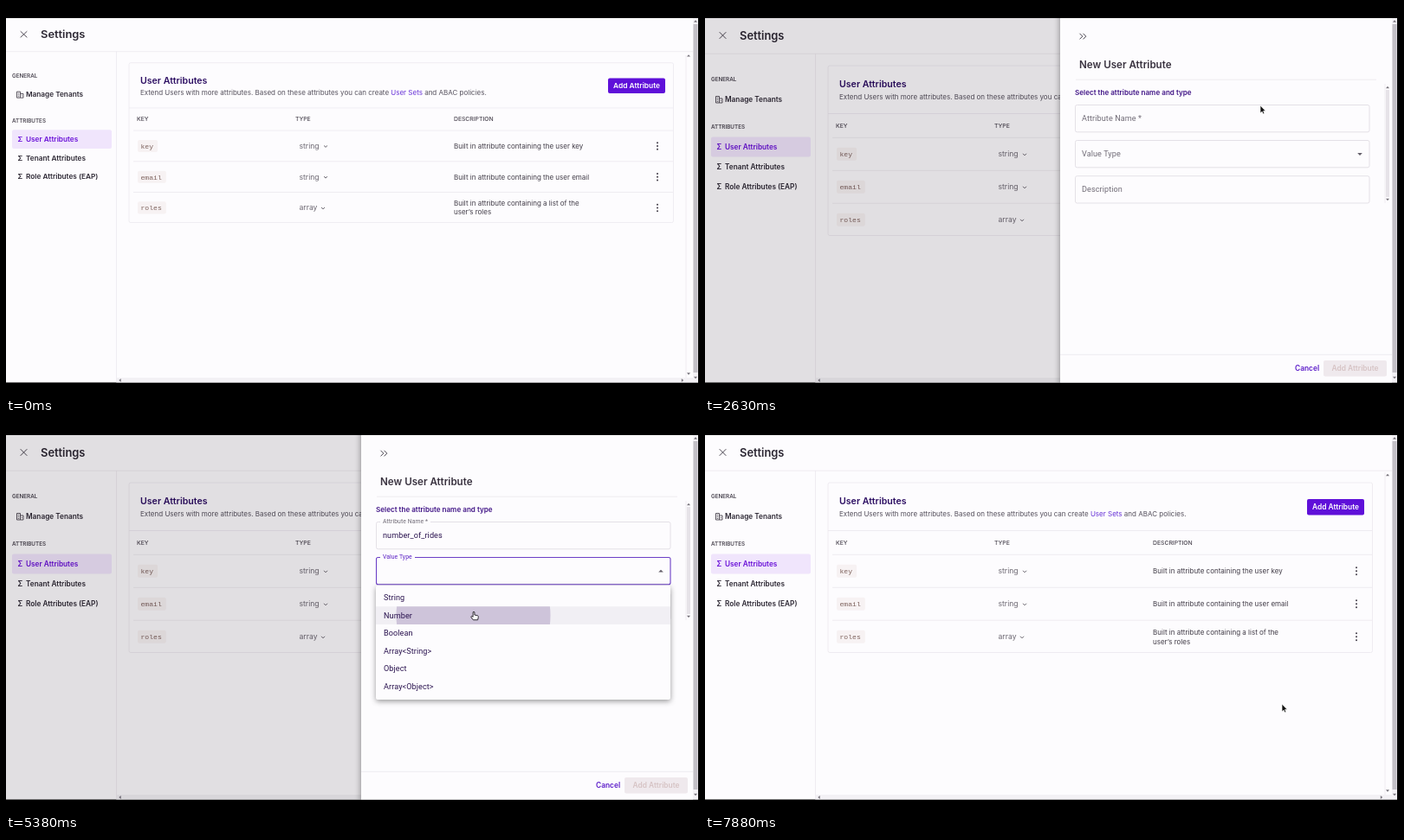
Recreate the animation shown at these times as an HTML page. Size 800 by 450 pixels, loop 8 s.

```html
<!DOCTYPE html>
<html lang="en">
<head>
<meta charset="utf-8">
<title>User attributes</title>
<style>
  html, body { margin: 0; width: 100%; height: 100%; overflow: hidden; background: #000; }
  svg { display: block; width: 800px; height: 450px; }
  text { font: 400 8px Inter, sans-serif; fill: #55505c; dominant-baseline: central; white-space: pre; }
  .nav text { font-size: 8.25px; font-weight: 600; fill: #2c2733; }
  .nav .cap { font-size: 6.3px; fill: #4a4550; }
  .nav .on { fill: #6a11d8; }
  text.page { font-size: 12.9px; font-weight: 600; fill: #2c2733; }
  text.head { font-size: 6.8px; font-weight: 500; fill: #4a4550; }
  text.title { font-size: 10.6px; font-weight: 600; fill: #2d0f63; }
  text.type { font-size: 8.6px; fill: #6b6670; }
  text.desc { fill: #403b46; }
  text.code { font: 8.1px "Liberation Mono", monospace; fill: #7d625d; }
  text.btn { font-size: 8.4px; font-weight: 600; fill: #fff; }
  text.panel { font-size: 11.6px; font-weight: 600; fill: #39323f; }
  text.lead { font-size: 8.1px; font-weight: 600; fill: #411587; }
  .form text, .menu text { font: 400 9.1px Roboto, sans-serif; letter-spacing: .00938em; fill: #2b1450; }
  .form .label { fill: #716c77; }
  .form .small { font-size: 6.85px; }
  .form .focus .small { fill: #5a1fc4; }
  .form .box { fill: none; stroke: #dddae1; stroke-width: .8; }
  .form .hover .box { stroke: #77727d; }
  .form .focus .box { stroke: #6b3fc6; stroke-width: 1.1; }
  .line { stroke: #ebe8ee; stroke-width: .8; fill: none; }
  .icon { stroke: #4a4550; fill: none; stroke-width: 1; }
  .lift { filter: drop-shadow(0 1.5px 2px #0006); }
</style>
</head>
<body>
<svg viewBox="0 0 800 450">
  <defs>
    <clipPath id="window"><rect y="14" width="799" height="421.5"/></clipPath>
    <clipPath id="view"><rect y="14" width="793" height="421.5"/></clipPath>
    <clipPath id="addClip"><rect x="695" y="88" width="66" height="18.5" rx="2"/></clipPath>
    <clipPath id="saveClip"><rect x="714" y="410" width="73" height="18.5" rx="2"/></clipPath>
    <clipPath id="rowClip"><rect x="427" y="212.3" width="340" height="20.7"/></clipPath>
    <g id="kebab" fill="#4a4550"><circle cy="-4" r="1.05"/><circle r="1.05"/><circle cy="4" r="1.05"/></g>
    <path id="chev" class="icon" style="stroke-width:.85" d="M-2 -1L0 1L2 -1"/>
    <path id="tri" fill="#77737b" d="M-2 1.2L0 -1.2L2 1.2z"/>
  </defs>

  <g clip-path="url(#window)">
    <rect width="800" height="450" fill="#fdfcfe"/>

    <g id="page">
      <path class="icon" d="M16.7 30.2l7.6 7.6m0-7.6l-7.6 7.6"/>
      <text class="page" x="40" y="34">Settings</text>
      <path class="line" d="M0 55.2H793M127.5 55V465"/>

      <g class="nav">
        <rect x="7" y="151.5" width="115" height="23" rx="2" fill="#f0e5fc"/>
        <text class="cap" x="7" y="85">GENERAL</text>
        <path class="icon" style="stroke-width:.9" d="M12.5 112V104.5H16.5V112zM16.5 107H20V112H16.5M13.8 106.5H15.2M13.8 108.5H15.2M13.8 110.5H15.2M17.8 109.5H18.7"/>
        <text x="23" y="108">Manage Tenants</text>
        <text class="cap" x="7" y="140">ATTRIBUTES</text>
        <text class="on" x="13.5" y="163">Σ</text><text class="on" x="23" y="163">User Attributes</text>
        <text x="13.5" y="186">Σ</text><text x="23" y="186">Tenant Attributes</text>
        <text x="13.5" y="209">Σ</text><text x="23" y="209">Role Attributes (EAP)</text>
      </g>

      <rect class="line" x="142" y="69" width="628.5" height="196.5" rx="2"/>
      <path class="line" d="M142 124.5H770M147 152.3H770M147 190.3H770M147 228.2H770"/>
      <text class="title" x="155" y="90.5">User Attributes</text>
      <text x="155" y="105.3">Extend Users with more attributes. Based on these attributes you can create <tspan fill="#6630d6">User Sets</tspan> and ABAC policies.</text>
      <text class="head" x="151" y="138.7">KEY</text>
      <text class="head" x="334" y="138.7">TYPE</text>
      <text class="head" x="517" y="138.7">DESCRIPTION</text>
      <g id="rows"></g>

      <g id="add">
        <rect x="695" y="88" width="66" height="18.5" rx="2"/>
        <circle id="addRipple" cx="756" cy="97" r="36" fill="#fff" fill-opacity=".18" clip-path="url(#addClip)"/>
        <text class="btn" x="728" y="97.2" text-anchor="middle">Add Attribute</text>
      </g>
      <use href="#tri" x="788" y="60"/>
    </g>

    <rect x="128" y="430" width="665" height="6" fill="#f3f1f5"/>
    <use href="#tri" transform="translate(131.5 433) rotate(-90)"/>
    <use href="#tri" transform="translate(781 433) rotate(90)"/>
    <path class="line" d="M785 57V430"/>
    <use href="#tri" transform="translate(788 425.5) rotate(180)"/>
  </g>

  <g clip-path="url(#view)">
    <rect id="shade" width="793" height="450" fill="#10060c"/>
    <g id="drawer">
      <rect x="410" y="4" width="400" height="442" fill="#fdfcfe" style="filter:drop-shadow(-1px 0 3px #0005)"/>
      <path class="icon" d="M432.5 31.8l3.3 3.3l-3.3 3.3M436.5 31.8l3.3 3.3l-3.3 3.3"/>
      <text class="panel" x="432" y="68">New User Attribute</text>
      <path class="line" d="M428 85.2H775M410 403.3H793M785 90V228"/>
      <rect x="786" y="97" width="4" height="124" fill="#e6e3e8"/>
      <use href="#tri" x="788" y="94"/>
      <use href="#tri" transform="translate(788 224) rotate(180)"/>
      <text class="lead" x="427" y="99.7">Select the attribute name and type</text>

      <g class="form">
        <g id="name">
          <rect class="box" x="427.5" y="114.5" width="339.5" height="31.3" rx="2"/>
          <text class="label big" x="435" y="130">Attribute Name *</text>
          <g class="float">
            <rect x="432" y="112" width="58" height="5" fill="#fdfcfe"/>
            <text class="label small" x="435" y="114">Attribute Name *</text>
          </g>
          <text id="typed" x="435" y="130"></text>
        </g>
        <g id="kind">
          <rect class="box" x="427.5" y="155.5" width="339.5" height="31.3" rx="2"/>
          <text class="label big" x="435" y="171">Value Type</text>
          <g class="float">
            <rect x="432" y="153" width="40" height="5" fill="#fdfcfe"/>
            <text class="label small" x="435" y="155.2">Value Type</text>
          </g>
          <text id="value" x="435" y="171.3">Number</text>
          <path id="caretIcon" fill="#625d68" d="M-2.8 -1.2H2.8L0 1.6z"/>
        </g>
        <g>
          <rect class="box" x="427.5" y="196.7" width="339.5" height="31.3" rx="2"/>
          <text class="label" x="435" y="212.2">Description</text>
        </g>
      </g>

      <text class="btn" x="681" y="419.3" style="fill:#5b1bc9">Cancel</text>
      <g id="save">
        <rect x="714" y="410" width="73" height="18.5" rx="2"/>
        <circle id="saveRipple" cx="752" cy="419" r="30" fill="#fff" fill-opacity=".18" clip-path="url(#saveClip)"/>
        <text class="btn" x="750.5" y="419.3" text-anchor="middle">Add Attribute</text>
      </g>
    </g>
    <g id="menu" class="menu">
      <rect x="427" y="188" width="340" height="132" rx="2" fill="#fdfcfe" style="filter:drop-shadow(0 2px 3px #0006)"/>
      <rect id="hot" x="427" width="340" height="20.7" fill="#f1eff4"/>
      <circle id="pick" cx="539.5" cy="222.6" r="89" fill="#cec4da" clip-path="url(#rowClip)"/>
      <g id="items"></g>
    </g>
  </g>

  <g clip-path="url(#window)">
    <rect x="793" width="6" height="450" fill="#f3f1f5"/>
    <rect x="793.5" y="21" width="5" height="403" fill="#c3c0c6"/>
    <use href="#tri" x="796" y="17.5"/>
    <use href="#tri" transform="translate(796 430) rotate(180)"/>
  </g>

  <g id="cursor" stroke-linejoin="round">
    <path id="arrow" d="M0 0V9L2.1 7.2L3.4 10L4.9 9.3L3.6 6.6H6.2z" fill="#111" stroke="#fff" stroke-width=".7"/>
    <path id="hand" d="M-.9 .8Q0 -.6 .9 .8V4L4.6 4.9Q5.5 5.2 5.3 6.5L4.6 9.8H-.6L-3.2 6.6Q-3.2 5.2 -1.9 5.6L-.9 6.4z" fill="#fff" stroke="#1c1820" stroke-width=".9"/>
    <path id="beam" d="M-1.7 0H1.7M0 0V9M-1.7 9H1.7" fill="none" stroke="#222" stroke-width=".9"/>
  </g>
</svg>

<script>
const $ = id => document.getElementById(id);
const LOOP = 8000, STEP = 125, WORD = 'number_of_rides';

const rows = [
  ['key', 'string', ['Built in attribute containing the user key']],
  ['email', 'string', ['Built in attribute containing the user email']],
  ['roles', 'array', ['Built in attribute containing a list of the', 'user’s roles']]
];
$('rows').innerHTML = rows.map(([key, type, lines], i) => {
  const y = 171.3 + 38 * i;
  const desc = lines.map((s, n) =>
    `<text class="desc" x="517" y="${y + 11 * (n - (lines.length - 1) / 2)}">${s}</text>`).join('');
  return `<rect x="152" y="${y - 7.5}" width="${key.length * 4.86 + 8.5}" height="15" rx="2" fill="#f7f2f3"/>
    <text class="code" x="155.5" y="${y + .5}">${key}</text>
    <text class="type" x="338.5" y="${y}">${type}</text>
    <use href="#chev" x="${type === 'array' ? 366 : 369}" y="${y + .5}"/>
    ${desc}<use href="#kebab" x="752" y="${y}"/>`;
}).join('');

$('items').innerHTML = ['String', 'Number', 'Boolean', 'Array&lt;String&gt;', 'Object', 'Array&lt;Object&gt;']
  .map((s, i) => `<text x="436" y="${202 + 20.6 * i}">${s}</text>`).join('');

// Piecewise linear track of [time, ...values]
function track(keys, t) {
  if (t <= keys[0][0]) return keys[0].slice(1);
  for (let i = 1; i < keys.length; i++) {
    const [a, b] = [keys[i - 1], keys[i]];
    if (t <= b[0]) {
      const p = (t - a[0]) / (b[0] - a[0]);
      return a.slice(1).map((v, n) => v + (b[n + 1] - v) * p);
    }
  }
  return keys[keys.length - 1].slice(1);
}

const squash = [[0, .9405], [125, .98], [250, 1]];
const slide = [[2125, 0], [2250, .6], [2375, .95], [2500, 1], [7500, 1], [7625, .75], [7750, .2], [7875, 0]];
const fade = [[4000, 0], [4125, .5], [4250, 1], [5375, 1], [5500, .45], [5625, 0]];
const path = [
  [1000, 782, 421], [1250, 772, 300], [1500, 760, 150], [1750, 755, 93], [2250, 755, 93],
  [2625, 641, 115], [2750, 615, 125], [3625, 612, 132], [3875, 599, 165], [4375, 599, 165],
  [4750, 575, 190], [5250, 540, 218], [5875, 540, 218], [6250, 640, 315], [6625, 746, 410],
  [6750, 751, 415], [7125, 751, 415], [7250, 706, 368], [7375, 666, 325]
];

const show = (id, on) => $(id).style.display = on ? '' : 'none';
const inside = (x, y, l, t, r, b) => x >= l && x <= r && y >= t && y <= b;

function field(id, filled, focus, hover) {
  const g = $(id);
  g.setAttribute('class', focus ? 'focus' : hover ? 'hover' : '');
  g.querySelector('.big').style.display = filled || focus ? 'none' : '';
  g.querySelector('.float').style.display = filled || focus ? '' : 'none';
}

function button(id, fill, ink, lifted, ripple) {
  $(id).querySelector('rect').setAttribute('fill', fill);
  $(id).querySelector('text').style.fill = ink;
  $(id).setAttribute('class', lifted ? 'lift' : '');
  show(id + 'Ripple', ripple);
}

function draw(t) {
  const between = (a, b) => t >= a && t < b;
  const [x, y] = track(path, t), [open] = track(slide, t), [menu] = track(fade, t);

  $('page').setAttribute('transform', `translate(0 14) scale(1 ${track(squash, t)[0]}) translate(0 -14)`);
  const addHot = between(2000, 2375);
  button('add', addHot ? '#8d78ea' : '#5f10d9', '#fff', addHot, between(2125, 2375));

  $('shade').style.opacity = .115 * open;
  show('drawer', open > 0);
  $('drawer').setAttribute('transform', `translate(${392 * (1 - open)} 0)`);

  const count = Math.max(0, Math.min(15, (t - 2875) / STEP * 3 + 3));
  const naming = between(2875, 4000);
  field('name', count > 0, naming, false);
  $('typed').textContent = WORD.slice(0, count) + (naming ? '|' : '');

  const chosen = t >= 5500, menuOpen = between(4000, 5500);
  field('kind', chosen, between(4000, 6625), between(3750, 4000));
  show('value', chosen);
  $('caretIcon').setAttribute('transform', `translate(756 171.3) rotate(${menuOpen ? 180 : 0})`);

  show('menu', menu > 0);
  $('menu').style.opacity = menu;
  const row = Math.floor((y + 2 - 191.7) / 20.6);
  show('hot', row >= 0 && t < 5500);
  $('hot').setAttribute('y', 191.7 + 20.6 * row);
  show('pick', t >= 5375);

  const saveHot = between(6625, 7250);
  button('save', !chosen ? '#efe9ed' : saveHot ? '#8d78ea' : '#5c0cd8',
    chosen ? '#fff' : '#d6c3c4', saveHot, between(6750, 7000));

  show('cursor', t >= 1000 && !between(2875, 3625));
  $('cursor').setAttribute('transform', `translate(${x} ${y})`);
  const onSave = chosen && open === 1 && inside(x, y, 714, 408, 787, 428);
  const hand = addHot || menu > 0 || onSave ||
    (open === 1 && inside(x, y, 427, 155, 767, 187)) ||
    (open === 0 && inside(x, y, 695, 88, 761, 106));
  const beam = !hand && open === 1 &&
    (inside(x, y, 427, 117, 767, 146) || inside(x, y, 427, 196, 767, 228));
  show('hand', hand);
  show('beam', beam);
  show('arrow', !hand && !beam);
}

function tick() {
  const t = Math.floor(performance.now() % LOOP / 10) * 10;
  draw(Math.floor(t / STEP) * STEP);
  requestAnimationFrame(tick);
}
tick();
</script>
</body>
</html>
```
